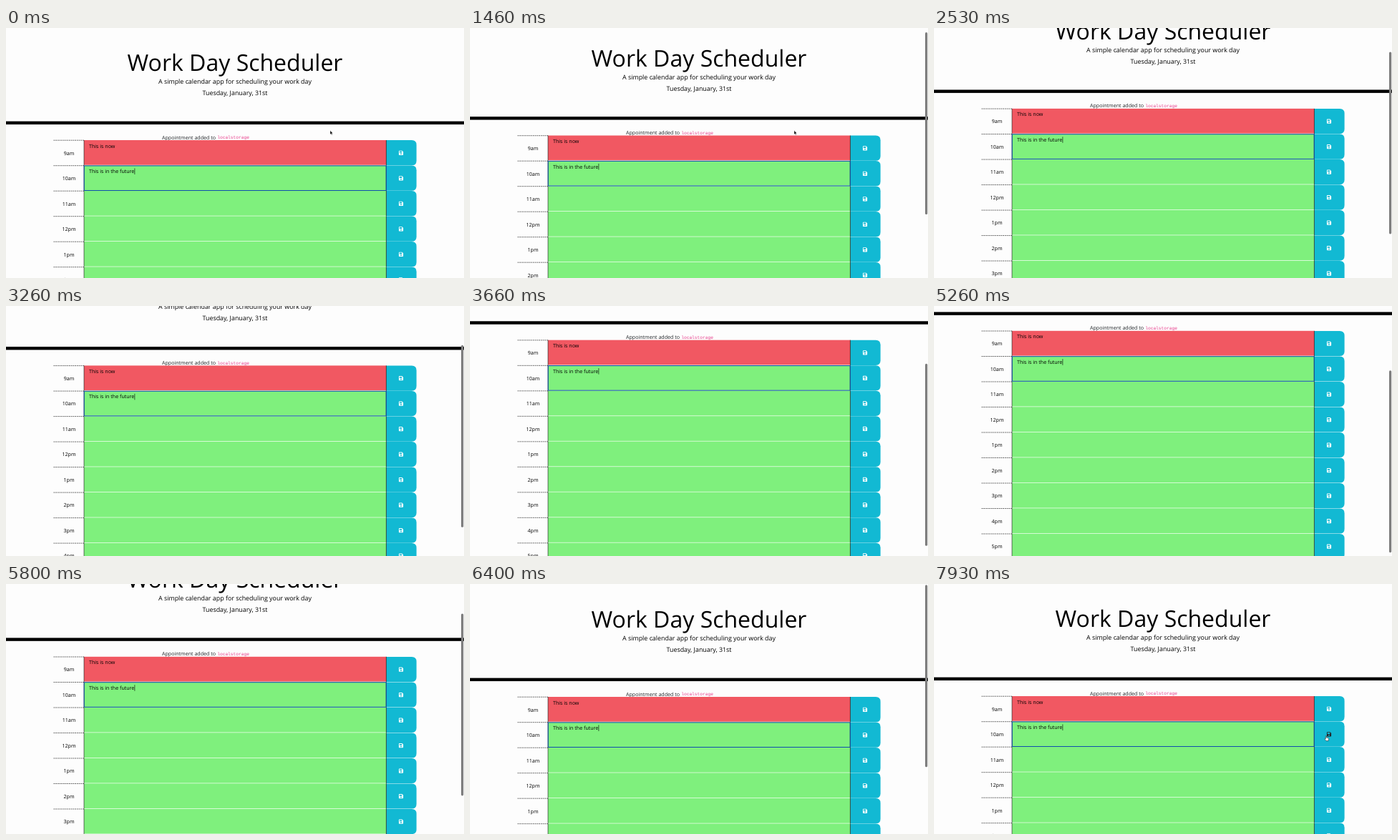
Recreate the animation shown at these times as an HTML page. Size 640 by 350 pixels, loop 8 s.

```html
<!DOCTYPE html>
<html lang="en">
<head>
<meta charset="utf-8">
<title>Work Day Scheduler</title>
<style>
  html, body { margin: 0; width: 100%; height: 100%; overflow: hidden; background: #fdfdfd; }
  svg { display: block; width: 100vw; height: 100vh; }
  text { font: 7.1px "Open Sans", "Noto Sans", sans-serif; text-rendering: geometricPrecision; }
  .title { font-size: 32px; }
  .lead { font-size: 8.88px; }
  .mid { text-anchor: middle; }
  .code { font: 6.22px "Liberation Mono", "DejaVu Sans Mono", monospace; fill: #e83e8c; }
</style>
</head>
<body>
<svg viewBox="0 0 640 350">
  <g id="page">
    <text class="title mid" x="320" y="60">Work Day Scheduler</text>
    <text class="lead mid" x="320" y="78">A simple calendar app for scheduling your work day</text>
    <text class="lead mid" x="320" y="94">Tuesday, January, 31st</text>
    <rect y="130.6" width="640" height="4.44"/>
    <text x="218" y="155.6" fill="#212529">Appointment added to</text>
    <text class="code" x="295.2" y="155.2">localstorage</text>
    <g id="rows"></g>
    <rect x="109.2" y="192.9" width="422" height="34.6" fill="none" stroke="#0f4fae"/>
    <rect x="179.6" y="196.4" width=".6" height="8.6"/>
  </g>
  <rect id="thumb" x="636" width="3.2" height="255" rx="1.6" fill="#7d7d7d"/>
  <path id="arrow" d="M0 0v5.4l1.3-1.1 .8 1.9 .9-.4-.8-1.8h1.6z" stroke="#fff" stroke-width=".4"/>
  <path id="hand" d="M-.6 0q.6-.6 1.1 0v2.4l2.3.6q.9.3.8 1.3l-.5 2.7h-3.2l-2-2.6q-.2-.9.7-.7l.8.6z"
    fill="#fff" stroke="#111" stroke-width=".5"/>
</svg>
<script>
const LOOP = 8000, TOP = 157, PITCH = 35.5;
const GREEN = '#7ff07d', RED = '#f15862', CYAN = '#12b9d3';
const HOURS = ['9am', '10am', '11am', '12pm', '1pm', '2pm', '3pm', '4pm', '5pm'];
const NOTES = ['This is now', 'This is in the future'];
const DISK = 'M-2.4-3.1H1.5L3.1-1.5V2.4Q3.1 3.1 2.4 3.1H-2.4Q-3.1 3.1-3.1 2.4V-2.4Q-3.1-3.1-2.4-3.1Z' +
  'M-2.2-2.2V-.4H1.3V-2.2ZM0 .4A.95 .95 0 0 0 0 2.3A.95 .95 0 0 0 0 .4Z';
const $ = id => document.getElementById(id);

const row = (hour, i) => `<g transform="translate(0 ${TOP + i * PITCH})">
  <path d="M66.5 .2H109" stroke="#222" stroke-width=".7" stroke-dasharray="1.8 .9"/>
  <text class="mid" x="88" y="20.6">${hour}</text>
  <rect x="109" width="422.5" height="35.5" fill="${i ? GREEN : RED}"/>
  <path d="M109 35.2H531.5" stroke="#f4fff4" stroke-width=".9"/>
  <path d="M109 0V35.5" stroke="#111" stroke-width=".6"/>
  <text x="116" y="10.6">${NOTES[i] || ''}</text>
  <path d="M531.5 .1H567Q573.6 .1 573.6 6.7V28.7Q573.6 35.3 567 35.3H531.5Z" fill="${CYAN}"/>
  <path d="M531.4 0V35.5" stroke="#111" stroke-width=".7"/>
  <path class="disk" d="${DISK}" transform="translate(552 17.8)" fill="#fff" fill-rule="evenodd"/>
</g>`;
$('rows').innerHTML = HOURS.map(row).join('');
const disk = document.querySelectorAll('.disk')[1];

// time, scroll offset
const SCROLL = [
  [0, 0], [1200, 0], [1460, 6.5], [1930, 20], [2200, 20], [2800, 62], [3000, 62],
  [3260, 73.6], [3800, 118], [4200, 127.4], [4660, 129], [4860, 128], [5130, 128],
  [5260, 122.2], [5600, 84], [6000, 28], [6330, -1.2], [6400, -1], [6660, 0], [LOOP, 0]
];
const CURSOR_X = [[0, 453], [6860, 453], [7530, 547], [7860, 547], [7930, 548], [LOOP, 548]];
const CURSOR_Y = [[0, 143.6], [6860, 143.6], [7530, 211], [7860, 211], [7930, 212.6], [LOOP, 212.6]];

const slope = (a, b) => (b[1] - a[1]) / (b[0] - a[0]);

function tangent(keys, i) {
  if (i === 0 || i === keys.length - 1) return 0;
  const a = slope(keys[i - 1], keys[i]), b = slope(keys[i], keys[i + 1]);
  return a * b > 0 ? 2 * a * b / (a + b) : 0;
}

// monotone cubic through the keys
function curve(keys, t) {
  let i = 0;
  while (i < keys.length - 2 && t >= keys[i + 1][0]) i++;
  const [t0, v0] = keys[i], [t1, v1] = keys[i + 1];
  const d = t1 - t0, u = (t - t0) / d, w = 1 - u;
  return v0 * w * w * (1 + 2 * u) + v1 * u * u * (3 - 2 * u)
    + d * u * w * (w * tangent(keys, i) - u * tangent(keys, i + 1));
}

function draw(t) {
  const scroll = curve(SCROLL, t);
  const x = curve(CURSOR_X, t), y = curve(CURSOR_Y, t);
  const at = `translate(${x} ${y})`;
  const awake = t < 2000 || t >= 6860;
  $('page').setAttribute('transform', `translate(0 ${-scroll})`);
  $('thumb').setAttribute('y', 1.3 + .727 * Math.max(0, scroll));
  $('thumb').setAttribute('opacity', t < 1200 ? 0 : Math.max(0, Math.min(1, (7400 - t) / 300)));
  $('arrow').setAttribute('transform', at);
  $('hand').setAttribute('transform', at);
  $('arrow').setAttribute('opacity', awake && y < TOP - scroll ? 1 : 0);
  $('hand').setAttribute('opacity', x > 532 ? 1 : 0);
  disk.setAttribute('fill', x > 547.5 ? '#212529' : '#fff');
}

let start;
function tick(now) {
  start ??= now;
  draw((now - start) % LOOP);
  requestAnimationFrame(tick);
}
draw(0);
requestAnimationFrame(tick);
</script>
</body>
</html>
```
